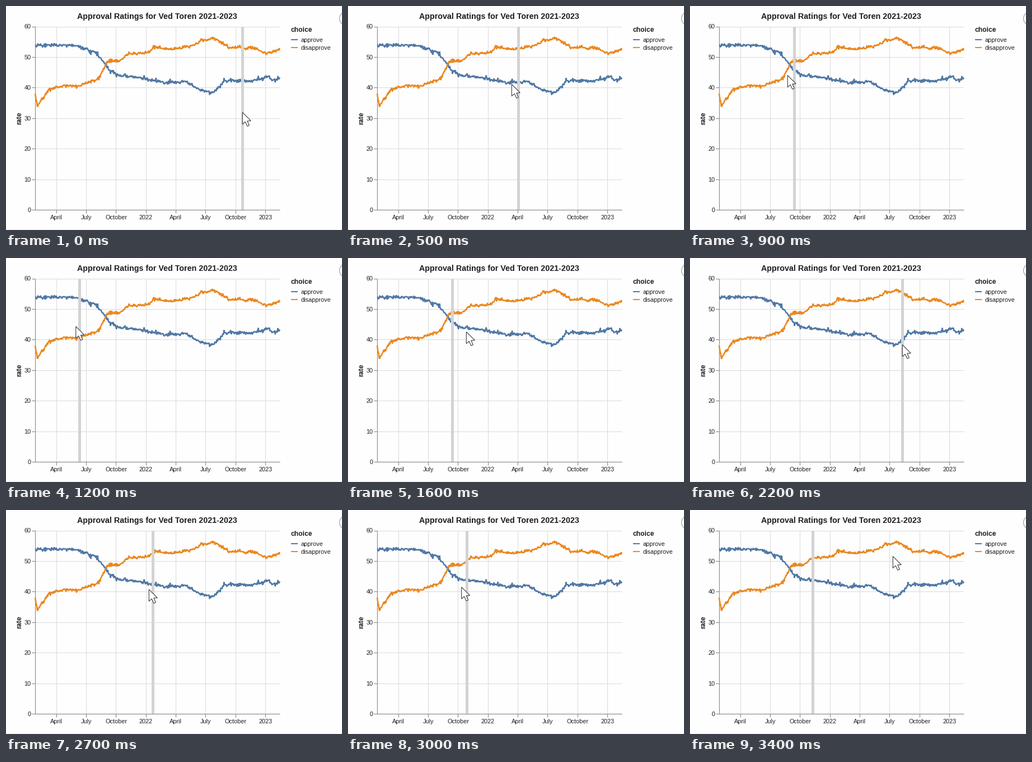
A matplotlib script for the animation above (3500 ms loop, 600 px wide and 399 px high).

```python
import numpy as np
import matplotlib.pyplot as plt
from matplotlib.animation import FuncAnimation
from matplotlib.patches import Circle, Polygon, Rectangle

W, H, DPI = 600, 399, 100
FRAMES, STEP = 35, 100
LEFT, RIGHT, TOP, BOTTOM = 51.9, 489.3, 36.6, 363.2
BLUE, ORANGE, GRID, AXIS, INK = "#5078a5", "#ea8820", "#dddddd", "#888888", "#1e1e1e"

plt.rcParams["font.family"] = "Liberation Sans"
fig = plt.figure(figsize=(W / DPI, H / DPI), dpi=DPI, facecolor="#fefefe")
ax = fig.add_axes([0, 0, 1, 1])
ax.set_xlim(0, W)
ax.set_ylim(H, 0)
ax.axis("off")


def px(n):
    return n * 72 / DPI


def seg(x0, y0, x1, y1, color, width=1.1, z=1):
    ax.plot([x0, x1], [y0, y1], color=color, lw=px(width), zorder=z,
            solid_capstyle="butt")


def label(x, y, s, size=10.9, **kw):
    ax.text(x, y, s, fontsize=px(size), color=INK, va="baseline", **kw)


def series(trend, color, seed):
    """One value per day: a trend, steps held for two days and rare spikes."""
    days = 748
    rng = np.random.default_rng(seed)
    x = np.linspace(LEFT, RIGHT, days)
    steps = np.repeat(rng.normal(0, 1.5, days // 2), 2)
    spikes = rng.normal(0, 4, days) * (rng.random(days) < 0.03)
    y = np.interp(x, *np.transpose(trend)) + steps + spikes
    ax.plot(x, y, color=color, lw=px(2.5), zorder=3,
            solid_joinstyle="bevel", solid_capstyle="butt")


# Axes and grid
for i in range(7):
    y = BOTTOM - (BOTTOM - TOP) * i / 6
    seg(LEFT, y, RIGHT, y, GRID)
    seg(LEFT - 5.5, y, LEFT, y, AXIS, z=2)
    label(44.6, y + 3.9, str(10 * i), ha="right")

ticks = ["April", "July", "October", "2022", "April", "July", "October", "2023"]
for i, name in enumerate(ticks):
    x = 89.6 + 53.35 * i
    seg(x, TOP, x, BOTTOM, GRID)
    seg(x, BOTTOM, x, BOTTOM + 5.5, AXIS, z=2)
    label(x + 0.3, 380.2, name, ha="center")

seg(LEFT, TOP, LEFT, BOTTOM, AXIS, z=2)
seg(LEFT, BOTTOM, RIGHT, BOTTOM, AXIS, z=2)

# Titles and legend
label(270.3, 23.4, "Approval Ratings for Ved Toren 2021-2023", 14.2,
      weight="bold", ha="center")
label(26.8, 200, "rate", 12.2, weight="bold", ha="center", rotation=90,
      rotation_mode="anchor")
label(508.3, 46, "choice", 12, weight="bold")
for y, name, color in [(60.3, "approve", BLUE), (74.3, "disapprove", ORANGE)]:
    seg(509.3, y, 520.6, y, color, 2)
    label(526.2, y + 3.8, name)

# Page edges
ax.add_patch(Circle((607.5, 22.3), 12, fill=False, ec="#9a9a9a", lw=px(1.1)))
seg(0, 398, W, 398, "#f1f1f1", 1.5)

series([(52, 70), (125, 70), (160, 84), (174, 98), (184, 114), (206, 124),
        (250, 129), (284, 137), (320, 134), (343, 147), (369, 155),
        (392, 132), (438, 134), (468, 125), (476, 133), (490, 129)], BLUE, 4)
series([(52, 157), (56, 178), (76, 149), (104, 142), (130, 143), (166, 128),
        (181, 98), (202, 98), (218, 85), (254, 83), (266, 73), (292, 77),
        (330, 72), (350, 62), (369, 56), (398, 74), (440, 74), (466, 85),
        (490, 77)], ORANGE, 9)

# Pointer sweeps across the chart, the rule trails it.
# Rows: time in steps, pointer x, pointer y, rule x
PATH = np.array([
    (0, 422, 189, 422.2),
    (5, 292, 139, 304.6),
    (9, 174, 123, 186.1),
    (12.5, 125, 122, 130),
    (16, 211, 131, 186.1),
    (22, 379, 154, 379.5),
    (24, 388, 156, 388),
    (27, 255, 141, 262),
    (31, 215, 130, 208),
    (34, 362, 82, 219),
])
TIMES, POSES = PATH[:, 0], PATH[:, 1:]
SLOPES = np.gradient(POSES, TIMES, axis=0)
ARROW = np.array([(0, 0), (0, 21), (4.8, 16.7), (8.6, 24.6), (12, 23.2),
                  (8.6, 15.4), (15, 15)])


def pose(t):
    """Cubic Hermite curve through the path rows."""
    i = min(np.searchsorted(TIMES, t, side="right") - 1, len(TIMES) - 2)
    h = TIMES[i + 1] - TIMES[i]
    u = (t - TIMES[i]) / h
    ease = u * u * (3 - 2 * u)
    bend = h * u * (1 - u) * ((1 - u) * SLOPES[i] - u * SLOPES[i + 1])
    return POSES[i] + (POSES[i + 1] - POSES[i]) * ease + bend


RULE_W = 5
rule = ax.add_patch(Rectangle((0, TOP), RULE_W, BOTTOM - TOP, fc="#d3d3d3",
                              ec="none", zorder=5))
pointer = ax.add_patch(Polygon(ARROW, closed=True, fc="white", ec="#3a3a3a",
                               lw=px(1.1), joinstyle="miter", zorder=6))


def update(k):
    x, y, rule_x = pose(k)
    rule.set_x(rule_x - RULE_W / 2)
    pointer.set_xy(ARROW + (x + 0.3, y + 0.5))
    return rule, pointer


anim = FuncAnimation(fig, update, frames=FRAMES, interval=STEP, repeat=True,
                     repeat_delay=0, blit=False)
plt.show()
```
